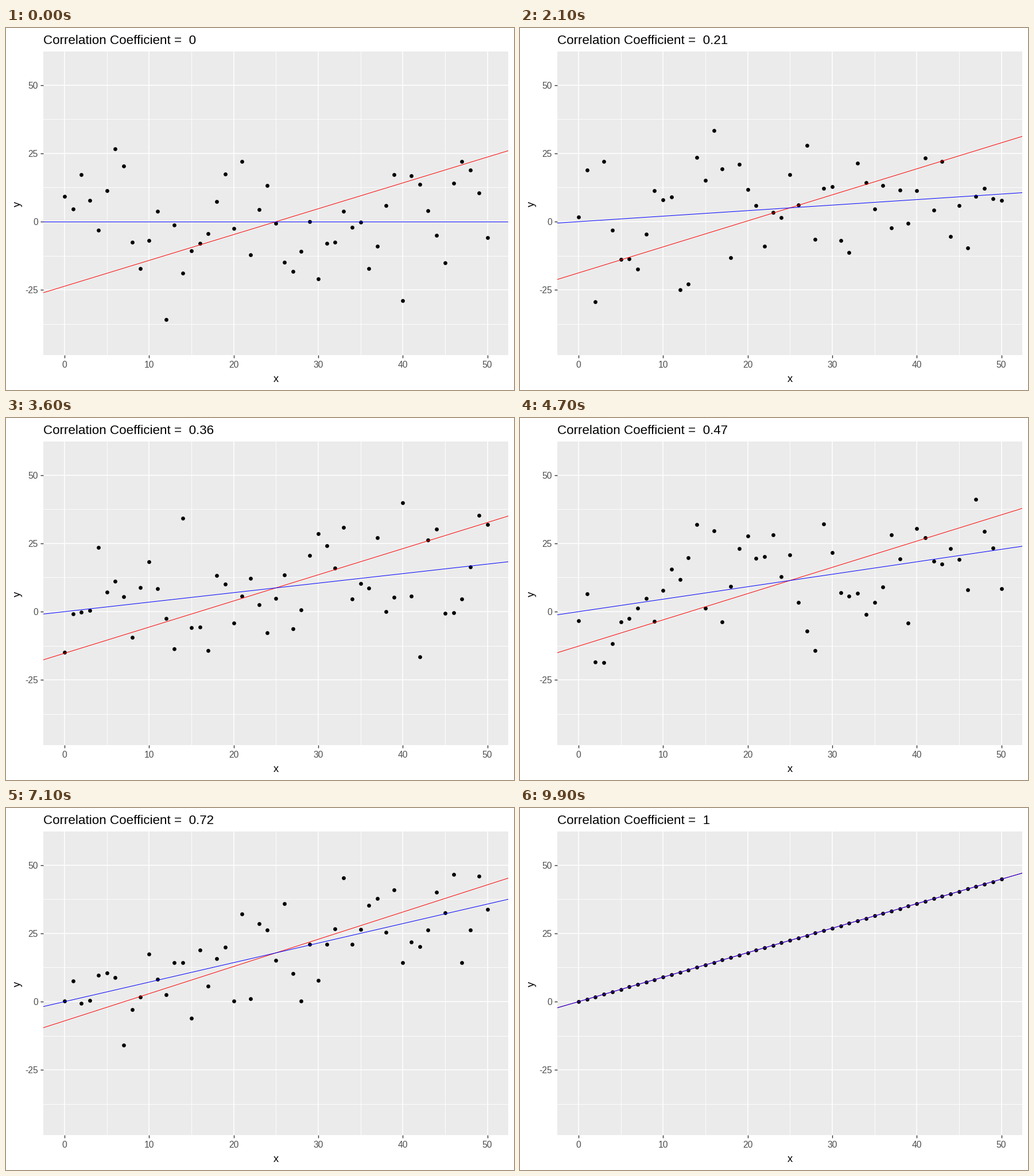
Animation of 885x632 px, one loop 10 s. Source, as a matplotlib script:

```python
import matplotlib.pyplot as plt
import numpy as np
from matplotlib.animation import FuncAnimation

W, H, DPI, FRAMES = 885, 632, 100, 100
PT = 72 / DPI  # points per pixel
LEFT, RIGHT, TOP, BOTTOM = 65, 875.4, 41.4, 571.4
LOW, HIGH = -43.8, 57.2  # range of y over the whole loop
plt.rcParams["font.family"] = "Liberation Sans"
plt.rcParams["axes.unicode_minus"] = False

X = np.arange(51)
SD_X = X.std(ddof=1)


def sd_slope(step):
    """Slope of the SD line: a slow rise, then a fall to the exact fit."""
    return np.interp(step, [0, 59, 71, 85, 99],
                     [0.9455, 0.965, 0.996, 0.931, 0.8966])


def sample(step):
    """Return y with an exact correlation to X, and both line slopes."""
    rho = step / (FRAMES - 1)
    slope = sd_slope(step)
    rng = np.random.default_rng(step)
    while True:
        noise = rng.standard_normal(X.size)
        noise -= np.polyval(np.polyfit(X, noise, 1), X)
        noise *= slope * SD_X / noise.std(ddof=1)
        y = rho * slope * X + np.sqrt(1 - rho**2) * noise
        if LOW <= y.min() and y.max() <= HIGH:
            return y, slope, rho * slope


fig = plt.figure(figsize=(W / DPI, H / DPI), dpi=DPI, facecolor="white")
ax = fig.add_axes([LEFT / W, 1 - BOTTOM / H,
                   (RIGHT - LEFT) / W, (BOTTOM - TOP) / H])
ax.set_facecolor("#EBEBEB")
ax.set_xlim(-2.5, 52.5)
ax.set_ylim(-48.9, 62.2)
ax.spines[:].set_visible(False)
ax.set_xticks(range(0, 51, 10))
ax.set_yticks(range(-25, 51, 25))
ax.set_xticks(range(5, 50, 10), minor=True)
ax.set_yticks(np.arange(-37.5, 40, 25), minor=True)
ax.set_axisbelow(True)
ax.grid(color="white", linewidth=1.5 * PT)
ax.grid(which="minor", color="white", linewidth=0.9 * PT)
ax.tick_params(length=4.6 * PT, width=1.4 * PT, color="#333333",
               labelcolor="#4D4D4D", labelsize=15.6 * PT)
ax.tick_params(axis="x", pad=5.2 * PT)
ax.tick_params(axis="y", pad=4.6 * PT)
ax.tick_params(which="minor", length=0)


def label(x, y, text, size, **kw):
    return fig.text(x / W, 1 - y / H, text, fontsize=size * PT,
                    color="black", **kw)


title = label(65.2, 28, "", 22.4, va="baseline")
label(470, 618, "x", 18.4, ha="center", va="baseline")
label(28.5, 307.5, "y", 18.4, ha="right", va="center", rotation=90)

dots, = ax.plot(X, 0 * X, "o", color="black", markersize=6.8 * PT,
                markeredgewidth=0, zorder=3)
ends = np.array([-2.5, 52.5])
red, blue = (ax.plot(ends, 0 * ends, color=c, linewidth=PT, zorder=4)[0]
             for c in ("red", "blue"))


def draw(step):
    y, steep, fit = sample(step)
    dots.set_ydata(y)
    red.set_ydata(y.mean() + steep * (ends - X.mean()))
    blue.set_ydata(fit * ends)
    rho = round(step / (FRAMES - 1), 2)
    title.set_text(f"Correlation Coefficient =  {rho:g}")
    return dots, red, blue, title


anim = FuncAnimation(fig, draw, frames=FRAMES, interval=100,
                     repeat=True, repeat_delay=0)
plt.show()
```
